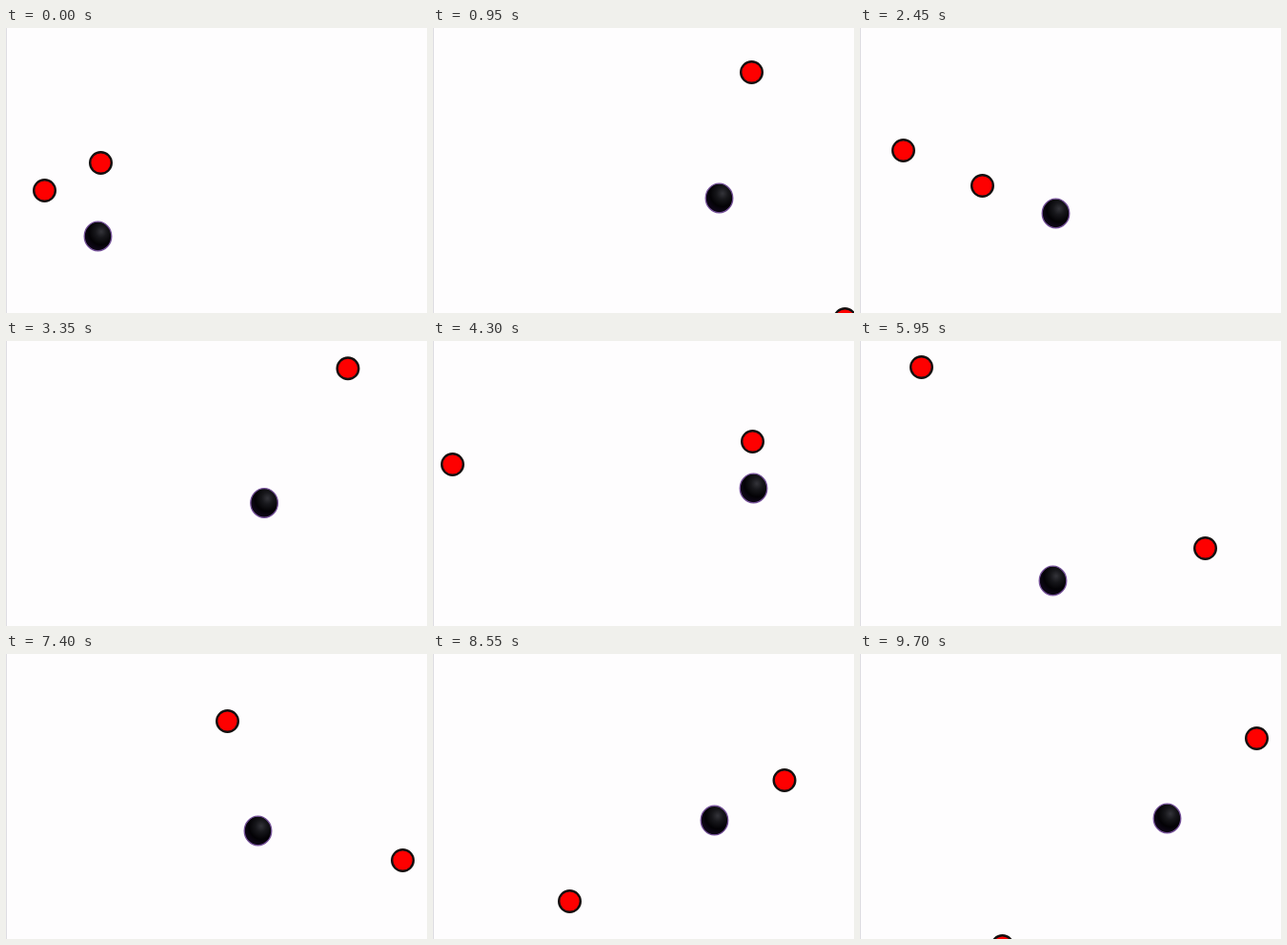
Write an HTML page that moves like this. It is 442x299 px and loops after 9.75 s.

```html
<!DOCTYPE html>
<html lang="en">
<head>
<meta charset="utf-8">
<title>Bouncing balls</title>
<style>
  html, body { margin: 0; width: 100%; height: 100%; overflow: hidden; background: #fefdfe; }
  svg { display: block; }
</style>
</head>
<body>
<svg width="442" height="299" viewBox="0 0 442 299">
  <defs>
    <radialGradient id="shade" cx=".62" cy=".34" r=".6">
      <stop offset="0" stop-color="#34343a"/>
      <stop offset=".35" stop-color="#17171b"/>
      <stop offset=".75" stop-color="#030205"/>
      <stop offset="1" stop-color="#0c0614"/>
    </radialGradient>
  </defs>
  <path d="M.5 0V299" stroke="#dedde2"/>
  <g fill="#fe0000" stroke="#141010" stroke-width="2.4">
    <circle id="redA" r="11.3"/>
    <circle id="redB" r="11.3"/>
  </g>
  <ellipse id="black" rx="14.3" ry="15.3" fill="url(#shade)" stroke="#76529a" stroke-width="1.3"/>
</svg>
<script>
const LOOP = 9750, STEP = 50;
const WALL_X = [12, 547], WALL_Y = [14, 323];
const TIMES = [0, 950, 2450, 4300, 5950, 7400, 9700];

// Points each ball passes; the red ones bounce off the walls between them.
const redA = [[99, 141], [334, 46], [128, 165], [20, 129], [64, 27], [416, 216], [416, 88]];
const redB = [[40, 170], [432, 305], [45, 128], [335, 105], [362, 217], [232, 70], [149, 306]];
const black = [[96, 218], [300, 178], [205, 194], [336, 154], [202, 251], [264, 185], [322, 172]];

const axis = (points, n) => points.map(p => p[n]);

// Mirror a straight run back between the walls.
function fold(v, [lo, hi]) {
  const span = hi - lo, period = 2 * span;
  const m = ((v - lo) % period + period) % period;
  return lo + (m > span ? period - m : m);
}

// Straighten a bouncing run: take the mirror image nearest to steady speed (px/s).
function unfold(values, [lo, hi], speed, heading) {
  const period = 2 * (hi - lo);
  const run = [heading < 0 ? 2 * lo - values[0] : values[0]];
  for (let i = 1; i < values.length; i++) {
    const goal = run[i - 1] + speed * (TIMES[i] - TIMES[i - 1]) / 1000;
    const [a, b] = [values[i], 2 * lo - values[i]]
      .map(v => v + period * Math.round((goal - v) / period));
    run.push(Math.abs(a - goal) < Math.abs(b - goal) ? a : b);
  }
  return run;
}

function bounce(values, wall, speed, heading) {
  const run = unfold(values, wall, speed, heading);
  return (i, k) => fold(run[i] + (run[i + 1] - run[i]) * k, wall);
}

function glide(p) {
  const slope = i => {
    const a = Math.max(i - 1, 0), b = Math.min(i + 1, p.length - 1);
    return (p[b] - p[a]) / (TIMES[b] - TIMES[a]);
  };
  return (i, k) => {
    const h = TIMES[i + 1] - TIMES[i], k2 = k * k, k3 = k2 * k;
    return p[i] + (p[i + 1] - p[i]) * (3 * k2 - 2 * k3)
      + h * (slope(i) * (k3 - 2 * k2 + k) + slope(i + 1) * (k3 - k2));
  };
}

const ball = (id, x, y) => ({ node: document.getElementById(id), x, y });
const balls = [
  ball("redA", bounce(axis(redA, 0), WALL_X, 480, -1), bounce(axis(redA, 1), WALL_Y, 130, -1)),
  ball("redB", bounce(axis(redB, 0), WALL_X, 415, 1), bounce(axis(redB, 1), WALL_Y, 140, 1)),
  ball("black", glide(axis(black, 0)), glide(axis(black, 1)))
];

const start = performance.now();

function draw(now) {
  const t = Math.floor(Math.max(now - start, 0) % LOOP / STEP) * STEP;
  let i = 0;
  while (i < TIMES.length - 2 && t >= TIMES[i + 1]) i++;
  const k = (t - TIMES[i]) / (TIMES[i + 1] - TIMES[i]);

  for (const { node, x, y } of balls) {
    // Points name whole pixels, so aim for their centres.
    node.setAttribute("cx", (x(i, k) + 0.5).toFixed(2));
    node.setAttribute("cy", (y(i, k) + 0.5).toFixed(2));
  }
  requestAnimationFrame(draw);
}

draw(start);
</script>
</body>
</html>
```
